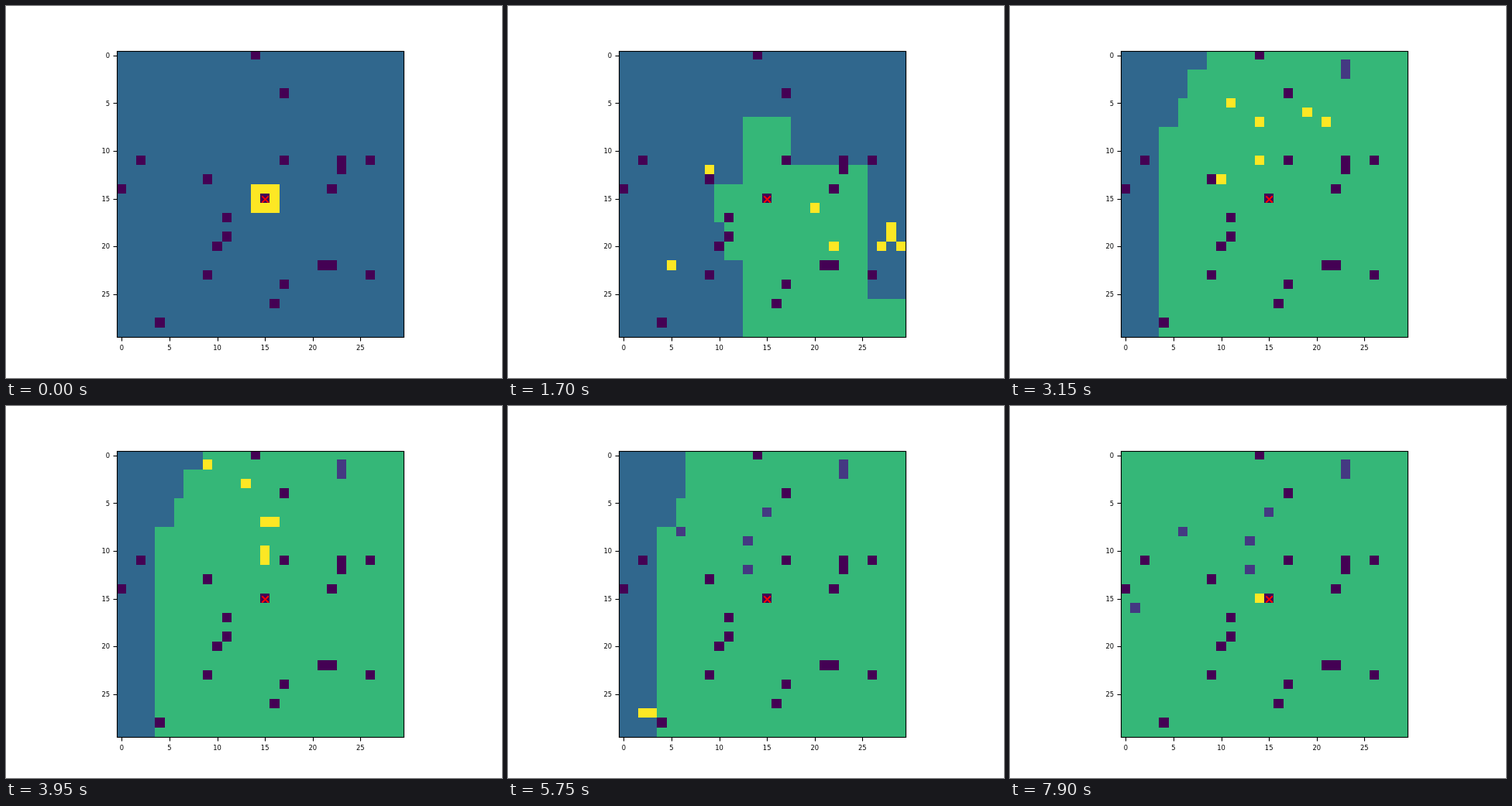
An HTML page with a canvas that plays this animation: 640 by 480 pixels, repeating every 8 s.

```html
<!DOCTYPE html>
<html lang="en">
<head>
<meta charset="utf-8">
<title>Grid exploration</title>
<style>
html, body { margin: 0; width: 100%; height: 100%; overflow: hidden; background: #fff; }
canvas { display: block; }
</style>
</head>
<body>
<canvas id="stage" width="640" height="480"></canvas>
<script>
const ctx = document.getElementById('stage').getContext('2d');
const N = 30, HOME = 15, STEP_MS = 50, LAST = 158, LOOP_MS = 8000;
const WALL = '#440154', DEAD = '#443982', UNKNOWN = '#30678d', KNOWN = '#35b778', BOT = '#fde724';

const walls = [[14,0],[17,4],[2,11],[17,11],[23,11],[26,11],[23,12],[9,13],[0,14],[22,14],[HOME,HOME],
  [11,17],[11,19],[10,20],[21,22],[22,22],[9,23],[26,23],[17,24],[16,26],[4,28]];

// Bots start in a ring around home and share the steps at which they reach their stops.
const stopSteps = [0, 11, 34, 49, 79, 115, 143];
const stops = [
  [[13,20],[5,22],[13,12],[15,10],[6,8]],
  [[18,8],[20,16],[14,10],[13,3],[3,27],[1,1],[14,15]],
  [[19,19],[22,20],[13,9],[9,1],[2,27],[1,16]],
  [[16,17],[9,12],[5,15],[15,11],[13,12]],
  [[24,14],[28,18],[28,4],[23,1]],
  [[14,26],[27,20],[23,6],[15,7],[15,6]],
  [[15,26],[28,19],[26,7],[16,7],[13,9]],
  [[17,25],[29,20],[29,5],[23,2]]
];

const distance = (a, b) => Math.max(Math.abs(a[0] - b[0]), Math.abs(a[1] - b[1]));

// The last leg runs at full speed, one cell per step; a bot that ends away from home is dead.
const bots = stops.map((list, i) => {
  const ring = i < 4 ? i : i + 1;
  const path = [[HOME - 1 + ring % 3, HOME - 1 + Math.floor(ring / 3)], ...list];
  const end = path.length - 1;
  const steps = stopSteps.slice(0, end);
  steps.push(steps[end - 1] + distance(path[end - 1], path[end]));
  return { path, steps, diesAt: distance(path[end], [HOME, HOME]) > 1 ? steps[end] : Infinity };
});

function place({ path, steps }, step) {
  const i = steps.findIndex(s => s > step);
  if (i < 0) return path[path.length - 1];
  const k = (step - steps[i - 1]) / (steps[i] - steps[i - 1]);
  return path[i].map((to, j) => Math.round(path[i - 1][j] + (to - path[i - 1][j]) * k));
}

// Areas reported home at a step: left, top and, short of the far corner, right, bottom.
const reports = [
  { step: 1, areas: [[13,7,17,26],[13,12,22,15],[10,14,20,17],[11,14,19,19]] },
  { step: 26, areas: [[13,12,25,25],[11,14,20,21],[13,26]] },
  { step: 43, areas: [[7,11,26,20],[8,14,29,26],[10,14],[12,9,26,20],[13,7,20,20]] },
  { step: 63, areas: [[9,0],[7,2],[6,5],[4,8]] },
  { step: 80, areas: [[7,0]] },
  { step: 156, areas: [[0,0]] }
];
const inside = (x, y, [left, top, right = N - 1, bottom = N - 1]) =>
  x >= left && x <= right && y >= top && y <= bottom;

// The first bots move one cell per step and see two cells ahead.
const knownAt = Array.from({ length: N * N }, (_, i) => {
  const x = i % N, y = Math.floor(i / N);
  const report = reports.find(r => r.areas.some(area => inside(x, y, area)));
  return Math.max(report.step, distance([x, y], [HOME, HOME]) - 2);
});

const edge = (origin, i) => Math.round(origin + i * 37 / 3);
function cell(x, y, color) {
  const left = edge(143, x), top = edge(57, y);
  ctx.fillStyle = color;
  ctx.fillRect(left, top, edge(143, x + 1) - left, edge(57, y + 1) - top);
}

function line(x1, y1, x2, y2) {
  ctx.beginPath();
  ctx.moveTo(x1, y1);
  ctx.lineTo(x2, y2);
  ctx.stroke();
}

function drawAxes() {
  ctx.strokeStyle = ctx.fillStyle = '#000';
  ctx.lineWidth = 1.11;
  ctx.strokeRect(143.5, 58.5, 370, 369);
  ctx.font = '8.33px "DejaVu Sans", sans-serif';
  for (let v = 0; v < N; v += 5) {
    const tx = 143.2 + 12.32 * (v + 0.5), ty = 57.6 + 12.32 * (v + 0.5);
    const px = Math.round(tx) + 0.5, py = Math.round(ty) + 0.5;
    line(px, 427.5, px, 432.5);
    line(138.5, py, 143.5, py);
    ctx.textAlign = 'center';
    ctx.fillText(v, tx, 444);
    ctx.textAlign = 'right';
    ctx.fillText(v, 134, Math.round(ty + 3.3));
  }
}

// The home mark is painted once more each step, so its soft edges fill in.
function drawHome(step) {
  const x = 334.5, y = 249.5, r = 4;
  ctx.strokeStyle = '#f00';
  ctx.lineWidth = 1.39;
  for (let i = 0; i < step + 2; i++) {
    line(x - r, y - r, x + r, y + r);
    line(x - r, y + r, x + r, y - r);
  }
}

function draw(step) {
  ctx.fillStyle = '#fff';
  ctx.fillRect(0, 0, 640, 480);
  ctx.save();
  ctx.beginPath();
  ctx.rect(143, 58, 370, 369);
  ctx.clip();
  knownAt.forEach((s, i) => cell(i % N, Math.floor(i / N), step >= s ? KNOWN : UNKNOWN));
  const isDead = bot => step >= bot.diesAt;
  for (const bot of bots) if (isDead(bot)) cell(...place(bot, step), DEAD);
  for (const bot of bots) if (!isDead(bot)) cell(...place(bot, step), BOT);
  for (const [x, y] of walls) cell(x, y, WALL);
  ctx.restore();
  drawHome(step);
  drawAxes();
}

function tick() {
  draw(Math.min(LAST, Math.floor(performance.now() % LOOP_MS / STEP_MS)));
  requestAnimationFrame(tick);
}
tick();
</script>
</body>
</html>
```
